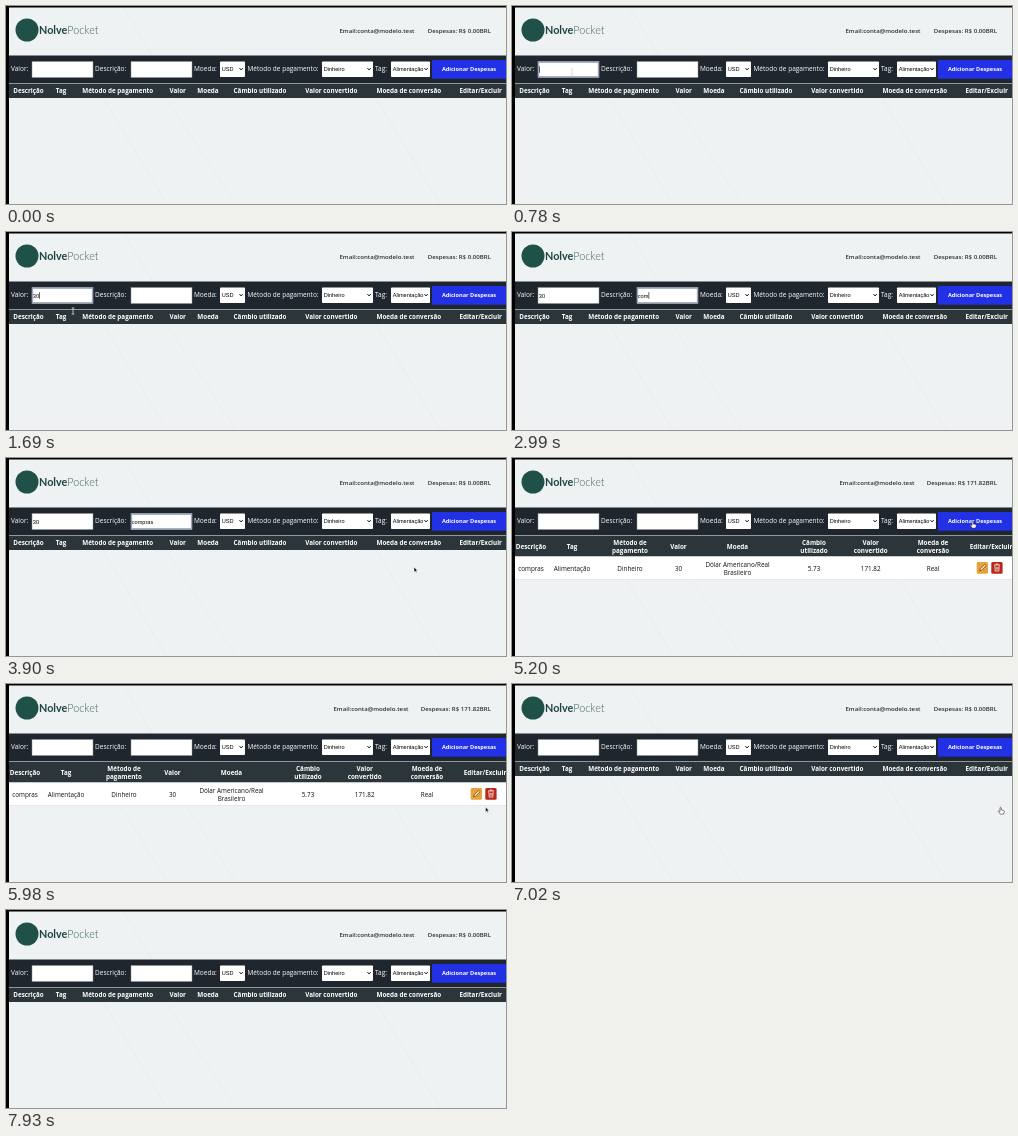
These frames come from a looping animation (500 by 198 pixels, 8.45 s). An HTML page:

```html
<!DOCTYPE html>
<html lang="pt-BR">
<head>
<meta charset="utf-8">
<title>Carteira de despesas</title>
<style>
  html, body { margin: 0; width: 100%; height: 100%; overflow: hidden; background: #eef2f3; }
  svg { display: block; width: 100vw; height: 100vh; }
  text { font: 6.5px "Open Sans", "Noto Sans", sans-serif; }
  .label { fill: #fff; }
  .head { fill: #fff; font-size: 6.3px; font-weight: 700; }
  .info { fill: #2a2f33; font-size: 6.1px; font-weight: 600; }
  .cell { fill: #111; font-size: 6.3px; font-weight: 500; }
  .field { fill: #000; font: 5.6px "Liberation Sans", Arial, sans-serif; }
  .button { fill: #fff; font-size: 5.6px; font-weight: 700; }
  .brand { fill: #1d4442; font: 700 10.8px Lato, sans-serif; }
  .brand tspan { fill: #3f605d; font-weight: 300; }
</style>
</head>
<body>
<svg id="stage" viewBox="0 0 500 198" preserveAspectRatio="none"></svg>
<script>
const LOOP = 8450, STEP = 130;
const ADDED = 4940, REMOVED = 7020;
const stage = document.getElementById('stage');

const text = (cls, x, y, s, anchor = 'start') =>
  `<text class="${cls}" x="${x}" y="${y}" text-anchor="${anchor}">${s}</text>`;
const rect = (x, y, w, h, fill, extra = '') =>
  `<rect x="${x}" y="${y}" width="${w}" height="${h}" fill="${fill}" ${extra}/>`;
const lines = (cls, x, y, gap, s) =>
  s.split('|').map((part, i) => text(cls, x, y + i * gap, part, 'middle')).join('');

const input = x => rect(x, 55.5, 61, 16, '#fff', 'stroke="#8b9096" stroke-width=".5"');
const select = (x, w, s) => rect(x, 55.5, w, 15.5, '#fff', 'rx=".8"') +
  text('field', x + 1.7, 65.4, s) +
  `<path d="M${x + w - 5.6} 62l1.7 2 1.7-2" fill="none" stroke="#111" stroke-width=".9"/>`;

const info = (emailEnd, total) =>
  text('info', emailEnd, 26.7, 'Email:conta@modelo.test', 'end') +
  text('info', 485, 26.7, `Despesas: R$ ${total}BRL`, 'end');

function emptyTable() {
  const heads = [[22.5, 'Descrição'], [55, 'Tag'], [111.7, 'Método de pagamento'], [171.7, 'Valor'],
    [202, 'Moeda'], [254, 'Câmbio utilizado'], [325.3, 'Valor convertido'],
    [402.8, 'Moeda de conversão'], [474.7, 'Editar/Excluir']];
  return info(408.5, '0.00') + rect(3, 78, 497, 14, '#2c363a') +
    heads.map(([x, s]) => text('head', x, 87.2, s, 'middle')).join('');
}

function filledTable() {
  const columns = [[19, 'Descrição', 'compras'], [60, 'Tag', 'Alimentação'],
    [118, 'Método de|pagamento', 'Dinheiro'], [166.5, 'Valor', '30'],
    [225.5, 'Moeda', 'Dólar Americano/Real|Brasileiro'], [302, 'Câmbio|utilizado', '5.73'],
    [358.7, 'Valor|convertido', '171.82'], [421, 'Moeda de|conversão', 'Real'],
    [479, 'Editar/Excluir', '']];
  const cell = (cls, x, mid, gap, s) =>
    lines(cls, x, s.includes('|') ? mid - gap / 2 : mid, gap, s);
  return info(402.5, '171.82') + rect(3, 78, 497, 20.5, '#2c363a') +
    rect(3, 98.5, 497, 23.3, '#fff') + rect(3, 121.3, 497, .6, '#d9dee0') +
    columns.map(([x, head, value]) =>
      cell('head', x, 90.7, 8, head) + cell('cell', x, 112.7, 7.6, value)).join('') +
    rect(464.7, 104, 11.3, 11.8, '#e9a23b', 'rx="1.4"') +
    '<path d="M467.7 112.7l.5-2 4.4-4.4 1.5 1.5-4.4 4.4z" fill="#fbe3b0" stroke="#5a3b12" stroke-width=".7"/>' +
    rect(479.3, 104, 11.3, 11.8, '#b8291c', 'rx="1.4"') +
    '<path d="M482 107h6M484 107v-1h2v1M482.8 107.5l.4 5.6h3.6l.4-5.6M484.2 109v2.8M485.8 109v2.8" fill="none" stroke="#fff" stroke-width=".7"/>';
}

stage.innerHTML =
  rect(0, 0, 500, 198, '#eef2f3') +
  '<path d="M97 92l64 106M160 92l70 106M370 92l64 106M118 2l28 47" fill="none" stroke="#e6ebec" stroke-width=".8"/>' +
  '<circle cx="21" cy="24" r="11.5" fill="#1f5149"/>' +
  `<text class="brand" x="33" y="28.3">Nolve<tspan>Pocket</tspan></text>` +
  rect(3, 49.5, 497, 28.5, '#20262d') +
  text('label', 5, 65.4, 'Valor:') + input(26) +
  text('label', 89, 65.4, 'Descrição:') + input(125) +
  text('label', 188, 65.4, 'Moeda:') + select(214, 25, 'USD') +
  text('label', 241.5, 65.4, 'Método de pagamento:') + select(316, 51, 'Dinheiro') +
  text('label', 369, 65.4, 'Tag:') + select(385, 39, 'Alimentação') +
  rect(426, 54, 74, 18.7, '#2230e6') + text('button', 463, 65.3, 'Adicionar Despesas', 'middle') +
  `<g id="empty">${emptyTable()}</g><g id="filled">${filledTable()}</g>` +
  rect(3, 77, 497, .8, '#aeb5b8') +
  text('field', 26.8, 65.6, '').replace('<text', '<text id="value"') +
  text('field', 125.8, 65.6, '').replace('<text', '<text id="description"') +
  rect(0, 56.2, 60, 14.6, 'none', 'id="focus" stroke="#9aa6bd" stroke-width="1.3"') +
  rect(0, 60.2, .6, 6.6, '#000', 'id="caret"') +
  '<g id="cursor" stroke-linejoin="round">' +
  '<path id="arrow" d="M0 0v5.2l1.2-1.1.9 2 .8-.4-.9-1.9h1.7z" fill="#111" stroke="#fff" stroke-width=".5"/>' +
  '<path id="beam" d="M-1.3-3h2.6M0-3v6M-1.3 3h2.6" fill="none" stroke="#d5d9dc" stroke-width=".8"/>' +
  '<path id="hand" d="M-1-3.4q.8-.7 1.3.2v2.1l2.4.6q.7.3.5 1.2l-.6 2.4h-3.4l-2-2.8q.3-.9 1.2-.2l.6.5z" fill="#fff" stroke="#333" stroke-width=".6"/>' +
  '</g>' +
  rect(0, 0, 500, 1.5, '#000') + rect(0, 0, 3, 198, '#000');

const $ = id => document.getElementById(id);
const show = (id, on) => $(id).setAttribute('display', on ? 'inline' : 'none');
const latest = (track, t) => track.filter(k => k[0] <= t).pop();

const valueTyping = [[0, ''], [1560, '3'], [1690, '30'], [ADDED, '']];
const descriptionTyping = [[0, ''], [2730, 'c'], [2860, 'co'], [2990, 'com'], [3120, 'comp'],
  [3250, 'compra'], [3380, 'compras'], [ADDED, '']];
const focusTrack = [[0, 0], [780, 26], [2600, 125], [4810, 0]];
const caretTrack = [[0, 0], [780, 1], [2080, 0], [2600, 1], [3900, 0]];

// Each move: start, end, from, to, pointer kind, time it disappears.
const moves = [
  [390, 780, [108, 84], [60, 66], 'beam', 1300],
  [1300, 1300, [67, 79], [67, 79], 'beam', 2080],
  [3900, 4420, [408, 109], [432, 98], 'arrow', 4550],
  [4550, 4680, [446, 82], [461, 67], 'hand', 5720],
  [5720, 5980, [468, 82], [479.5, 123], 'arrow', 6110],
  [6110, 6370, [482, 118], [489, 127], 'hand', 7410],
  [7410, 7930, [488, 142], [484, 203], 'arrow', 7930]
];

function drawCursor(t) {
  const move = moves.find(m => t >= m[0] && t < m[5]);
  show('cursor', move);
  if (!move) return;
  const [start, end, from, to, kind] = move;
  const p = end > start ? Math.min(1, (t - start) / (end - start)) : 1;
  const [x, y] = from.map((v, i) => v + (to[i] - v) * p);
  $('cursor').setAttribute('transform', `translate(${x} ${y})`);
  for (const id of ['arrow', 'beam', 'hand']) show(id, id === kind);
}

function draw(time) {
  const t = Math.floor((time % LOOP) / STEP + 1e-6) * STEP;
  const filled = t >= ADDED && t < REMOVED;
  show('filled', filled);
  show('empty', !filled);
  $('value').textContent = latest(valueTyping, t)[1];
  $('description').textContent = latest(descriptionTyping, t)[1];

  const focusX = latest(focusTrack, t)[1];
  show('focus', focusX);
  show('caret', focusX && latest(caretTrack, t)[1]);
  if (focusX) {
    const active = $(focusX === 26 ? 'value' : 'description');
    $('focus').setAttribute('x', focusX + .5);
    $('caret').setAttribute('x', focusX + 1 + active.getComputedTextLength());
  }
  drawCursor(t);
}

const origin = performance.now();
function tick() {
  draw(performance.now() - origin);
  requestAnimationFrame(tick);
}
tick();
</script>
</body>
</html>
```
